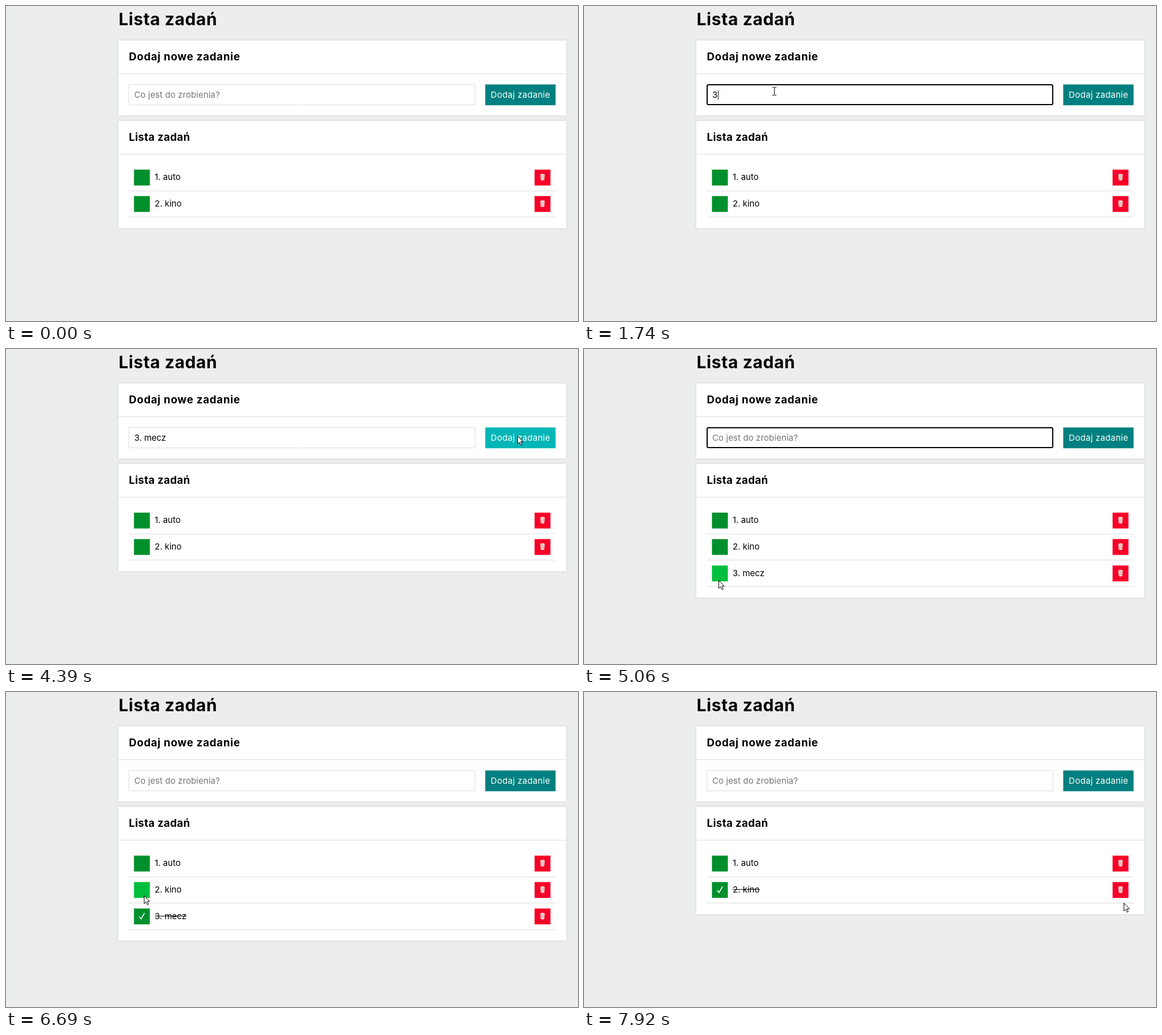
An HTML page with a canvas for the animation above (7.99 s loop, 1008 by 556 pixels).

```html
<!DOCTYPE html>
<html lang="pl">
<head>
<meta charset="utf-8">
<title>Lista zadań</title>
<style>
html, body { margin: 0; width: 100%; height: 100%; overflow: hidden; background: #eceeed; }
canvas { display: block; }
</style>
</head>
<body>
<canvas width="1008" height="556"></canvas>
<script>
const c = document.querySelector('canvas').getContext('2d');
const LOOP = 7990, FPS = 15, PRESS = 130, BLINK = 533;

// Mouse presses and typing
const clicks = { input: 870, add: 4250, check3: 5460, check2: 6690, remove: 7500 };
const added = 4440, word = '3. mecz', typeStart = 1740, keyGap = 208;

// Pointer moves along curves: start, end, control point, destination
const home = [919, 545];
const moves = [
  [70, 670, [440, 20], [335, 150]],
  [3580, 3840, [760, 215], [898, 101]],
  [3980, 4180, [900, 120], [901, 153]],
  [4450, 5130, [390, 430], [231, 407]],
  [5725, 6560, [1053, 552], [243, 359]],
  [6820, 7440, [640, 548], [950, 396]],
  [7640, 7920, [950, 385], [951, 370]]
];

const released = (name, t) => t >= clicks[name] + PRESS;

function pointer(t) {
  if (t < moves[0][0]) return { x: -99, y: -99 };
  let at = home;
  for (const [a, b, ctrl, to] of moves) {
    if (t < a) break;
    const u = Math.min(1, (t - a) / (b - a));
    const k = u * u * (3 - 2 * u), from = at;
    at = to.map((v, i) => (1 - k) ** 2 * from[i] + 2 * k * (1 - k) * ctrl[i] + k * k * v);
  }
  return { x: Math.round(at[0]), y: Math.round(at[1]) };
}

const inside = (p, x, y, w, h) => p.x >= x && p.x < x + w && p.y >= y && p.y < y + h;

function box(x, y, w, h, color) {
  c.fillStyle = color;
  c.fillRect(x, y, w, h);
}

function button(p, x, y, w, h, color, hover) {
  box(x, y, w, h, inside(p, x, y, w, h) ? hover : color);
}

function text(s, x, y, size = 15, color = '#000', weight = 400, spacing = 0) {
  c.font = `${weight} ${size}px Inter, sans-serif`;
  c.letterSpacing = spacing + 'px';
  c.fillStyle = color;
  c.fillText(s, x, y);
  return c.measureText(s).width;
}

function stroke(d, color, width = 1) {
  c.strokeStyle = color;
  c.lineWidth = width;
  c.stroke(new Path2D(d));
}

function card(y, h, title, spacing) {
  c.shadowColor = '#d4d4d4';
  c.shadowBlur = 5;
  box(198, y, 789, h, '#fff');
  c.shadowBlur = 0;
  c.shadowColor = 'transparent';
  box(198, y + 58, 789, 1, '#ddd');
  text(title, 216.5, y + 35, 18.7, '#000', 700, spacing);
}

function trash(x, y) {
  c.save();
  c.translate(x, y);
  c.fillStyle = '#f8e6dc';
  c.fill(new Path2D('M-4 -5Q0 -7 4 -5L3 5Q0 6.5 -3 5Z'));
  stroke('M-3.5 -3.5H3.5M-1.5 -2.5V4M.5 -2.5V4M2.2 -2.5V4', '#c58d84', 0.7);
  c.restore();
}

function row(i, label, done, p) {
  const y = 288.8 + 46.67 * i;
  button(p, 225.5, y, 28, 28, '#008f2d', '#00bf3c');
  button(p, 931.5, y, 28, 28, '#f70028', '#ff3355');
  trash(945.5, y + 13.5);
  box(216.5, Math.round(y + 37), 752, 1, '#ddd');
  const w = text(label, 262, y + 18.5);
  if (done) {
    box(262, Math.round(y + 13), w, 1, '#000');
    stroke(`M235 ${y + 14.5}L238 ${y + 18.5}L244 ${y + 8}`, '#fff', 1.6);
  }
}

function field(t) {
  const blurred = t >= clicks.add && t < added;
  const focus = t >= clicks.input && t < clicks.check3 && !blurred;
  c.lineWidth = focus ? 2 : 1;
  c.strokeStyle = focus ? '#000' : '#ddd';
  c.beginPath();
  if (focus) c.roundRect(217, 139, 609, 35, 2);
  else c.rect(216.5, 138.5, 610, 36);
  c.stroke();

  const keys = Math.min(word.length, Math.max(0, Math.floor((t - typeStart) / keyGap) + 1));
  const value = t < added ? word.slice(0, keys) : '';
  const w = value ? text(value, 226, 161.5) : 0;
  if (!value) text('Co jest do zrobienia?', 226, 161.5, 15, '#757575', 400, 0.1);

  const lastEdit = t >= added ? added : keys ? typeStart + (keys - 1) * keyGap : clicks.input;
  if (focus && (t - lastEdit) % (2 * BLINK) < BLINK) box(Math.round(226.5 + w), 149, 1, 16, '#000');
}

function drawPointer(p) {
  c.save();
  c.translate(p.x, p.y);
  if (inside(p, 217, 139, 609, 36)) {
    stroke('M-3 -6.5H-1Q.5 -6.5 .5 -5.5Q.5 -6.5 2 -6.5H4M.5 -6V7M-3 7.5H-1Q.5 7.5 .5 6.5Q.5 7.5 2 7.5H4', '#000');
  } else {
    const d = 'M.5 .5V14.5L3.7 11.6L6 16.7L8.2 15.7L5.9 10.7H10.2Z';
    c.fillStyle = '#fff';
    c.fill(new Path2D(d));
    stroke(d, '#000');
  }
  c.restore();
}

function draw(t) {
  const p = pointer(t);
  const three = t >= added && !released('remove', t);
  box(0, 0, 1008, 556, '#eceeed');
  text('Lista zadań', 198.5, 34, 30, '#000', 700, 0.6);

  card(61, 132, 'Dodaj nowe zadanie', 0.74);
  field(t);
  button(p, 844.5, 138.5, 124, 36.7, '#008080', '#00b6b6');
  text('Dodaj zadanie', 854.3, 161.5, 15, '#fff', 400, 0.3);

  card(203, three ? 235.5 : 189, 'Lista zadań', 0.35);
  row(0, '1. auto', false, p);
  row(1, '2. kino', released('check2', t), p);
  if (three) row(2, '3. mecz', released('check3', t), p);

  if (Object.values(clicks).some(a => t >= a && t < a + PRESS)) {
    c.fillStyle = 'rgba(255, 250, 0, .5)';
    c.beginPath();
    c.arc(p.x, p.y, 11, 0, 7);
    c.fill();
  }
  drawPointer(p);
}

const start = performance.now();
function tick() {
  const t = (performance.now() - start) % LOOP;
  // The screen refreshes FPS times a second; +5 ms absorbs rounding
  draw(Math.floor((t + 10) * FPS / 1000) * 1000 / FPS + 10);
  requestAnimationFrame(tick);
}
tick();
</script>
</body>
</html>
```
